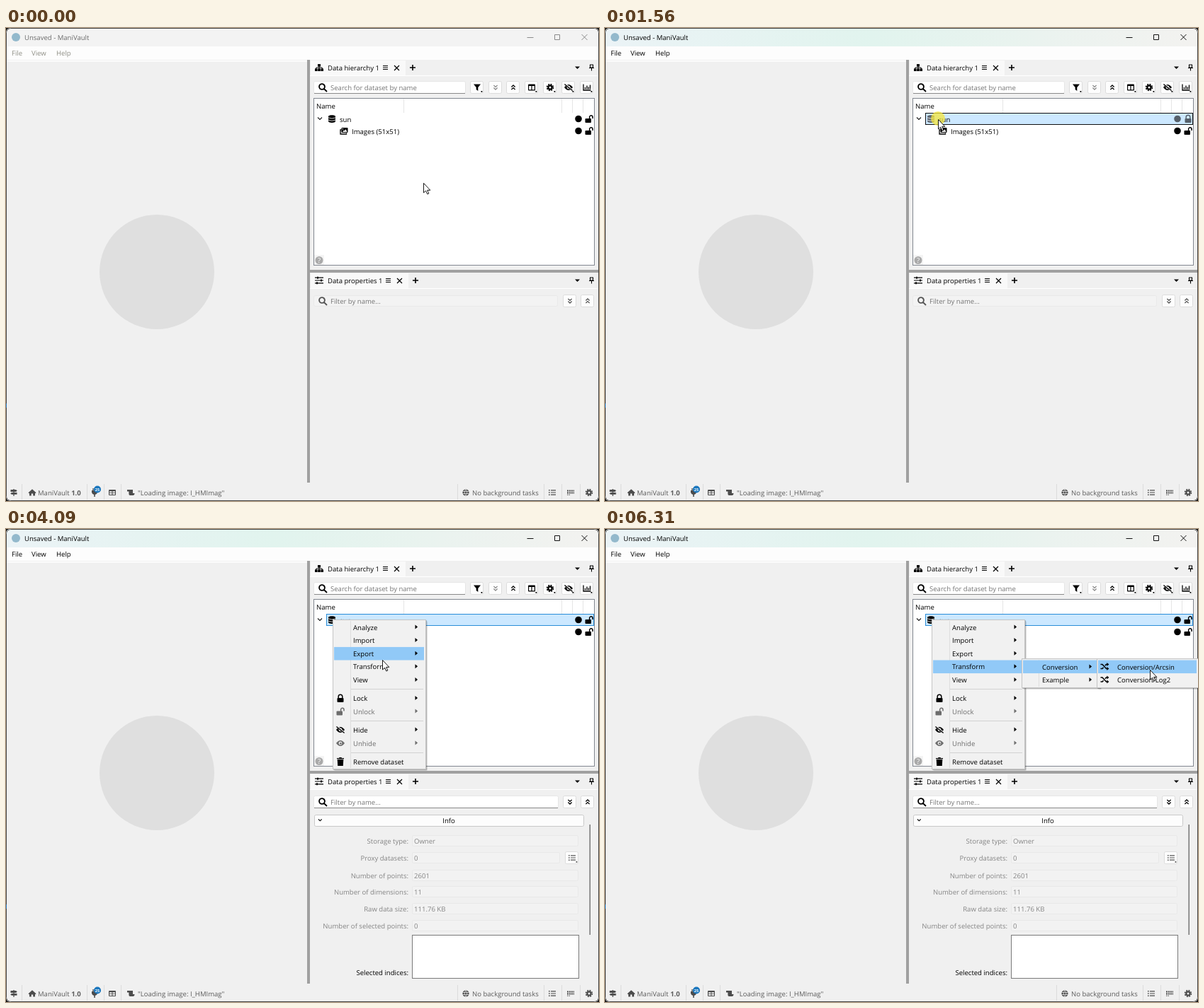
These frames come from a looping animation (837x669 px, 7.32 s). An HTML page:

```html
<!DOCTYPE html>
<html lang="en">
<head>
<meta charset="utf-8">
<title>Data hierarchy</title>
<style>
  html, body { margin: 0; width: 100%; height: 100%; overflow: hidden; background: #111; }
  svg { display: block; width: 837px; height: 669px; }
  text { font: 9.55px "Open Sans", "Noto Sans", sans-serif; text-rendering: geometricPrecision; white-space: pre; }
  .caption { fill: #6b6b6b; }
  .bar { fill: #8f8f86; }
  .tool { stroke: #8a8a8a; }
  .active .caption, .active .bar { fill: #000; }
  .active .tool { stroke: #111; }
</style>
</head>
<body>
<svg id="stage" viewBox="0 0 837 669"></svg>
<script>
const LOOP = 7320;
const INK = '#000', DIM = '#858585', STATUS = '#5c5c5c';

// Drawing helpers
const rect = (x, y, w, h, fill, stroke, r = 0) => stroke
  ? `<rect x="${x + .5}" y="${y + .5}" width="${w - 1}" height="${h - 1}" rx="${r}" fill="${fill}" stroke="${stroke}"/>`
  : `<rect x="${x}" y="${y}" width="${w}" height="${h}" rx="${r}" fill="${fill}"/>`;
const text = (x, mid, s, fill = INK, extra = '') =>
  `<text x="${x}" y="${mid + 3.5}" fill="${fill}" ${extra}>${s}</text>`;
const dot = (x, y, r, fill) => `<circle cx="${x}" cy="${y}" r="${r}" fill="${fill}"/>`;
const line = (d, color = INK, w = 1, extra = '') =>
  `<path d="${d}" fill="none" stroke="${color}" stroke-width="${w}" ${extra}/>`;
const shape = (d, fill = INK) => `<path d="${d}" fill="${fill}"/>`;
const at = (x, y, body) => `<g transform="translate(${x} ${y})">${body}</g>`;
const group = (id, body, extra = '') => `<g id="${id}" ${extra}>${body}</g>`;

// Icons, centred on 0,0
const icon = {
  database: c => shape('M-5-3.5C-5-6 5-6 5-3.5V3.5C5 6-5 6-5 3.5Z', c)
    + line('M-5-1.6Q0 .6 5-1.6M-5 1.7Q0 3.9 5 1.7', '#fff', .8),
  images: c => line('M-3.5-1.5H-5V4.5H3.5V3', c, 1.3) + rect(-3.5, -4.5, 9, 7, c, '', 1)
    + shape('M-2 1.5L0-1 1 0 2.5-2.2 4.5 1.5Z', '#fff') + dot(-1.6, -2.7, .8, '#fff'),
  lock: c => rect(-4.5, -.5, 9, 6, c, '', 1) + line('M-2.8 0V-2.5A2.8 2.8 0 0 1 2.8-2.5V0', c, 1.5),
  unlock: c => rect(-5.5, -.5, 8.5, 6, c, '', 1) + line('M.6 0V-2.5A2.2 2.2 0 0 1 5-2.5V-.6', c, 1.5),
  search: c => dot(-1, -1, 3.8, 'none') + line('M2.9-1A3.9 3.9 0 1 1-4.9-1 3.9 3.9 0 1 1 2.9-1M1.8 1.8L6 6', c, 1.9),
  filter: c => shape('M-5-4.5H5L1.3 0V5L-1.3 3V0Z', c),
  down: c => line('M-2.6-3L0-.6 2.6-3M-2.6.6L0 3 2.6.6', c, 1.3),
  up: c => line('M-2.6-.6L0-3 2.6-.6M-2.6 3L0 .6 2.6 3', c, 1.3),
  table: c => rect(-5, -4.5, 10, 9, c, '', 1) + shape('M-3.8-2H-.6V3.3H-3.8ZM.6-2H3.8V3.3H.6Z', '#fff'),
  grid: c => rect(-5, -4, 10, 8, c, '', 1) + shape('M-3.9-1.8H-.5V.2H-3.9ZM.5-1.8H3.9V.2H.5ZM-3.9 1H-.5V3H-3.9ZM.5 1H3.9V3H.5Z', '#f0f0f0'),
  gear: c => line('M4.4 0A4.4 4.4 0 1 1-4.4 0 4.4 4.4 0 1 1 4.4 0', c, 1.7, 'stroke-dasharray="2 1.46"')
    + line('M2.6 0A2.6 2.6 0 1 1-2.6 0 2.6 2.6 0 1 1 2.6 0', c, 2.2),
  eye: c => shape('M-6 0Q0-8 6 0Q0 8-6 0Z', c) + dot(0, 0, 2.4, '#f0f0f0') + dot(.3, .2, 1.3, c),
  hidden: c => icon.eye(c) + line('M-5.4-5L5.4 4', '#f0f0f0', 2.6) + line('M-5.6-4.4L5.6 4.4', c, 1.3),
  chart: c => line('M-5-4.5V4H5.5', c, 1.3) + line('M-2.5 2.5V0M0 2.5V-2.5M2.3 2.5V-.6M4.5 2.5V-3.5', c, 1.3),
  tree: c => rect(-2, -5, 4, 3.6, c) + rect(-6, 1.4, 3.6, 3.6, c) + rect(-1.8, 1.4, 3.6, 3.6, c) + rect(2.4, 1.4, 3.6, 3.6, c)
    + line('M0-2V2M-4.2 2V0H4.2V2', c),
  sliders: c => line('M-6-3.8H6M-6 0H6M-6 3.8H6', c, 1.2) + line('M-2-5.3V-2.3M3-1.5V1.5M-3 2.3V5.3', c, 1.8),
  trash: c => shape('M-5-5H-2L-1.4-6H1.4L2-5H5V-3.7H-5ZM-4.3-3H4.3L3.8 6H-3.8Z', c),
  shuffle: c => line('M-5.5-3H-3L2.5 3H4.5M-5.5 3H-3L-1.4 1.3M.8-1.2L2.5-3H4.5', c, 1.5)
    + shape('M3.4-5.6L6.4-3 3.4-.5ZM3.4.5L6.4 3 3.4 5.6Z', c),
  list: c => line('M-2-3.2H5M-2 0H5M-2 3.2H5', c, 1.2) + line('M-5-3.2H-3.4M-5 0H-3.4M-5 3.2H-3.4', c, 1.5),
  home: c => shape('M-5.5.3L0-4.8 5.5.3 4.6 1.2 4 .7V4.5H1.2V1.5H-1.2V4.5H-4V.7L-4.6 1.2Z', c),
  sign: c => shape('M-4.5-4H3L4.8-2.4 3-1H-4.5ZM4.5 0H-3L-4.8 1.4-3 2.8H4.5Z', c) + line('M0-5V5', c, 1.3),
  scroll: c => shape('M-5-4H3V1H5.5Q5.5 4 3 4H-1Q-2.6 4-2.6 2V-1.5H-5Z', c),
  globe: c => dot(0, 0, 4.6, c) + line('M-4.5-1.5H4.5M-4.5 1.5H4.5M0-4.5Q-3.6 0 0 4.5Q3.6 0 0-4.5', '#f0f0f0', .7),
  plug: c => shape('M-4-3H4V0Q3 3 .8 3V6H-.8V3Q-3 3-4 0Z', c) + line('M-2-6V-3M2-6V-3', c, 1.3),
  blocks: c => line('M-5-2.5H5M-5 .5H5', c, 2.2, 'stroke-dasharray="2 .9"') + line('M-5 3.2H0', c, 1, 'stroke-dasharray="1.5 1"')
};
const put = (name, x, y, c = INK) => at(x, y, icon[name](c));
const button = (name, x, y, c, menu) => rect(x - 10, y - 9, 19, 18, '#fdfdfd', '#dcdcdc', 2)
  + put(name, x, y, c) + (menu ? rect(x + 5.5, y + 5, 1.8, 1.8, c) : '');

function dockHeader(y, glyph, title, x) {
  return rect(430, y - 10, x + 12 - 430, 21, '#f9f9f9') + rect(429, y + 11, 408, 1, '#fff')
    + put(glyph, 442, y) + text(454, y, title)
    + line(`M${x - 20} ${y - 2.5}h7m-7 2.5h7m-7 2.5h7`, INK, 1.1)
    + line(`M${x - 4} ${y - 3}l7 7m0-7l-7 7`, INK, 1.2)
    + line(`M${x + 18} ${y}h8m-4-4v8`, INK, 1.6)
    + shape(`M803 ${y - 1.5}h7l-3.5 3.5z`)
    + line(`M824.5 ${y - 4}h4v4h-4zM823 ${y + .5}h7m-3.5 0v4`, INK, 1.1);
}

function titleBar() {
  return `<defs><linearGradient id="mint"><stop stop-color="#ebf3f6"/><stop offset=".45" stop-color="#e1f4ee"/>
    <stop offset="1" stop-color="#f3f2f0"/></linearGradient></defs>`
    + rect(0, 0, 837, 27, '#f3f3f3') + group('glow', rect(0, 0, 837, 27, 'url(#mint)'))
    + dot(14, 13, 6, '#93b9cc') + text(26, 13, 'Unsaved - ManiVault', '', 'class="caption"')
    + `<path class="tool" d="M735.5 13.5h9M774.5 9.5h7v7h-7zM812.5 9l8 8m0-8l-8 8" fill="none"/>`
    + rect(0, 26, 837, 19, '#fdfdfd')
    + [[8, 'File'], [36, 'View'], [71, 'Help']].map(([x, s]) => text(x, 35, s, '', 'class="bar"')).join('');
}

function workspace() {
  return rect(0, 45, 837, 624, '#f0f0f0') + rect(1, 46, 424, 1.5, '#fff')
    + dot(213, 345, 81, '#dfdfdf')
    + rect(425, 45, 4, 598, '#a0a0a0') + rect(429, 342, 408, 4, '#a0a0a0');
}

const rowIcons = (y, c, locked) => dot(808, y, 4.8, c) + put(locked ? 'lock' : 'unlock', 823, y, c);

function hierarchy() {
  const tools = [['filter', 665, 1], ['down', 691, 0], ['up', 716, 0], ['table', 742, 1], ['gear', 768, 1], ['hidden', 794, 1], ['chart', 820, 1]];
  return dockHeader(56, 'tree', 'Data hierarchy 1', 552)
    + rect(434, 75, 215, 18, '#fff', '#e6e6e6', 2) + rect(435, 92, 213, 1, '#8a8a8a')
    + put('search', 447, 84) + text(458, 84, 'Search for dataset by name', '#767676')
    + tools.map(([n, x, m]) => button(n, x, 84, n === 'down' ? '#8c8c8c' : INK, m)).join('')
    + rect(434, 99, 397, 237, '#fff', '#828790')
    + [561, 784, 799, 814].map(x => rect(x, 100, 1, 20, '#e5e5e5')).join('')
    + text(438, 110.5, 'Name')
    + group('hover', rect(452, 120, 378, 17, '#e5f3ff'))
    + group('picked', rect(452, 120, 378, 17, '#cce8ff', '#111'))
    + group('unfocused', rect(452, 120, 378, 17, '#cce8ff', '#2a8dd8'))
    + line('M440 126.5l3 3 3-3', '#222', 1.2)
    + text(471, 129, 'sun')
    + group('ready', put('database', 460, 128.5) + rowIcons(128.5, INK))
    + group('busy', put('database', 460, 128.5, '#5d6670') + rowIcons(128.5, '#56606a', true))
    + put('images', 477, 145.5) + text(488, 146, 'Images (51x51)') + rowIcons(145.5, INK)
    + rect(435, 321, 14, 14, '#f4f4f4') + dot(442, 328.5, 5.5, '#aaa')
    + text(442, 328.5, '?', '#fff', 'text-anchor="middle" font-weight="700"');
}

function properties() {
  const rows = [['Storage type', 'Owner', 441], ['Proxy datasets', '0', 465], ['Number of points', '2601', 490],
    ['Number of dimensions', '11', 513], ['Raw data size', '111.76 KB', 537], ['Number of selected points', '0', 561]];
  const label = (s, y, c) => text(568, y, s + ':', c, 'text-anchor="end"');
  const info = rect(434, 377, 346, 18, '#fff', '#e6e6e6', 2) + rect(435, 394, 344, 1, '#8a8a8a')
    + put('search', 447, 386) + text(458, 386.5, 'Filter by name...', '#767676')
    + button('down', 796, 386, INK) + button('up', 821, 386, INK)
    + rect(435, 404, 381, 17, '#fdfdfd', '#c9c9c9', 2) + line('M441 410.5l2.3 2.3 2.3-2.3', INK, 1.1)
    + text(625, 412.5, 'Info', INK, 'text-anchor="middle"')
    + rows.map(([k, v, y], i) => rect(573, y - 8, i === 1 ? 209 : 235, 16, '#f2f2f2', '#e8e8e8', 2)
      + label(k, y, DIM) + text(576, y, v, DIM)).join('')
    + button('list', 799, 465, '#555', 1)
    + rect(573, 574, 236, 62, '#fff', '#7a7a7a') + label('Selected indices', 627.5, INK)
    + rect(823.5, 418, 1.5, 156, '#777');
  const empty = rect(434, 378, 345, 16, '#f3f3f3', '#e9e9e9', 2)
    + put('search', 447, 386, '#555') + text(458, 386.5, 'Filter by name...', '#757575')
    + button('down', 796, 386, '#555') + button('up', 821, 386, '#555');
  return dockHeader(357, 'sliders', 'Data properties 1', 556) + group('empty', empty) + group('info', info);
}

function statusBar() {
  const icons = [['sign', 11], ['home', 37], ['plug', 125], ['grid', 150], ['scroll', 176], ['globe', 649], ['list', 771], ['blocks', 797], ['gear', 823]];
  return [22, 114, 138, 162, 637, 759, 784, 810].map(x => rect(x, 645, 1, 22, '#dcdcdc')).join('')
    + icons.map(([n, x]) => put(n, x, 657, '#4c4c4c')).join('')
    + text(45, 657, 'ManiVault <tspan font-weight="700">1.0</tspan>', STATUS)
    + dot(129, 652.5, 5, '#1976bd') + text(129, 651, '25', '#fff', 'text-anchor="middle" style="font-size:5.5px;font-weight:700"')
    + text(186, 657, '"Loading image: I_HMImag"', STATUS) + text(658, 657, 'No background tasks', STATUS);
}

// Menus
const pop = (x, y, w, h) => rect(x + 2, y + 2, w, h, 'rgba(0,0,0,.12)', '', 2) + rect(x + 1, y + 1, w, h, 'rgba(0,0,0,.18)')
  + rect(x, y, w, h, '#f1f1f1', '#c4c4c4');
const bar = (id, x, y, w) => group(id, rect(x, y - 9.3, w, 18.6, '#91c9f7'));
const arrow = (x, y, c) => shape(`M${x} ${y - 3}l3.6 3-3.6 3z`, c);
const MAIN = [['Analyze', 139], ['Import', 157.6], ['Export', 176.2], ['Transform', 194.8], ['View', 213.4],
  ['Lock', 239.5, 'lock'], ['Unlock', 258, 'unlock', 1], ['Hide', 284, 'hidden'], ['Unhide', 303, 'eye', 1], ['Remove dataset', 329, 'trash']];
const TRANSFORM = 3;

function menus() {
  const main = pop(461, 128, 132, 212) + rect(486, 130, 1, 208, '#dedede')
    + [226, 271, 316].map(y => rect(487, y, 102, 1, '#d2d2d2')).join('')
    + MAIN.slice(0, 4).map(([, y], i) => bar('main' + i, 463, y, 127)).join('')
    + MAIN.map(([s, y, glyph, off]) => {
      const c = off ? '#6d6d6d' : INK;
      return (glyph ? put(glyph, 472, y, c) : '') + text(490, y, s, c) + (glyph === 'trash' ? '' : arrow(577.5, y - .5, c));
    }).join('');
  const kinds = pop(588, 183, 111, 42) + rect(612, 185, 1, 38, '#dedede') + bar('kindBar', 590, 194.8, 104)
    + text(617, 195, 'Conversion') + text(617, 213.4, 'Example') + arrow(683.5, 194.5) + arrow(683.5, 213);
  const leaves = pop(694, 183, 145, 42) + bar('leafBar', 696, 194.8, 139)
    + put('shuffle', 705, 194.5) + put('shuffle', 705, 213)
    + text(723, 195, 'Conversion/Arcsin') + text(723, 213.4, 'Conversion/Log2');
  return group('main', main) + group('kinds', kinds) + group('leaves', leaves);
}

const stage = document.getElementById('stage');
stage.innerHTML = '<clipPath id="win"><rect width="837" height="669" rx="6"/></clipPath><g clip-path="url(#win)">'
  + workspace() + titleBar() + hierarchy() + properties() + statusBar()
  + rect(0, 0, 837, 669, 'none', '#454545', 6) + rect(0, 531, 1, 6, '#2478c0') + menus()
  + '<circle id="click" r="10" opacity=".75"/>'
  + group('cursor', '<path d="M.5.5V14L3.6 11.2 5.8 16 7.8 15.1 5.7 10.4H9.8Z" fill="#fff" stroke="#000" stroke-width=".9"/>')
  + '</g>';

// Pointer moves: start, end, steps, target x, y
const MOVES = [
  [390, 1090, 11, 478, 131], [1160, 1230, 2, 470, 129], [2030, 2030, 1, 467, 128], [2230, 2500, 4, 461, 128],
  [2980, 3670, 11, 505, 144], [3740, 4090, 6, 531, 185], [4160, 4300, 3, 530, 192],
  [4690, 4830, 3, 607, 195], [5900, 6310, 7, 769, 199]
];
// Clicks: start, end, x, y, colour
const CLICKS = [[1430, 1830, 470, 128, '#f4e63c'], [2630, 2770, 461, 126, '#f4e63c'], [5090, 5300, 606, 195, '#bfe03c']];

function pointer(t) {
  let x = 589, y = 219;
  for (const [from, to, n, tx, ty] of MOVES) {
    if (t < from) break;
    const gap = n > 1 ? (to - from) / (n - 1) : 1;
    const p = Math.min(1, (Math.floor((t - from) / gap + 1e-6) + 1) / n);
    const e = p * p * (3 - 2 * p);
    x += (tx - x) * e;
    y += (ty - y) * e;
  }
  return [Math.round(x), Math.round(y)];
}

const el = id => document.getElementById(id);
const show = (id, on) => el(id).setAttribute('visibility', on ? 'inherit' : 'hidden');
function fade(id, t, start, steps) {
  const p = Math.min(1, (Math.floor((t - start) / 70) + 1) / steps);
  el(id).setAttribute('opacity', p);
  show(id, t >= start);
}

function draw(t) {
  const [x, y] = pointer(t);
  const active = t >= 1490, busy = t >= 1490 && t < 1730;
  stage.classList.toggle('active', active);
  show('glow', active);
  show('hover', y >= 120 && y < 137 && !active);
  show('picked', active && t < 2910);
  show('unfocused', t >= 2910);
  show('busy', busy);
  show('ready', !busy);
  show('info', t >= 1660);
  show('empty', t < 1660);

  fade('main', t, 2910, 3);
  fade('kinds', t, 4300, 3);
  fade('leaves', t, 5090, 4);
  const row = t >= 4160 ? TRANSFORM : Math.floor((y - 129.7) / 18.6);
  for (let i = 0; i < 4; i++) show('main' + i, t >= 3050 && i === row);
  show('kindBar', x >= 590 && t >= 4690);
  show('leafBar', x >= 696 && t >= 5900);

  const hit = CLICKS.find(([from, to]) => t >= from && t < to);
  show('click', hit);
  if (hit) {
    el('click').setAttribute('cx', hit[2]);
    el('click').setAttribute('cy', hit[3]);
    el('click').setAttribute('fill', hit[4]);
  }
  el('cursor').setAttribute('transform', `translate(${x} ${y})`);
}

const start = performance.now();
function tick() {
  draw((performance.now() - start) % LOOP);
  requestAnimationFrame(tick);
}
tick();
</script>
</body>
</html>
```
